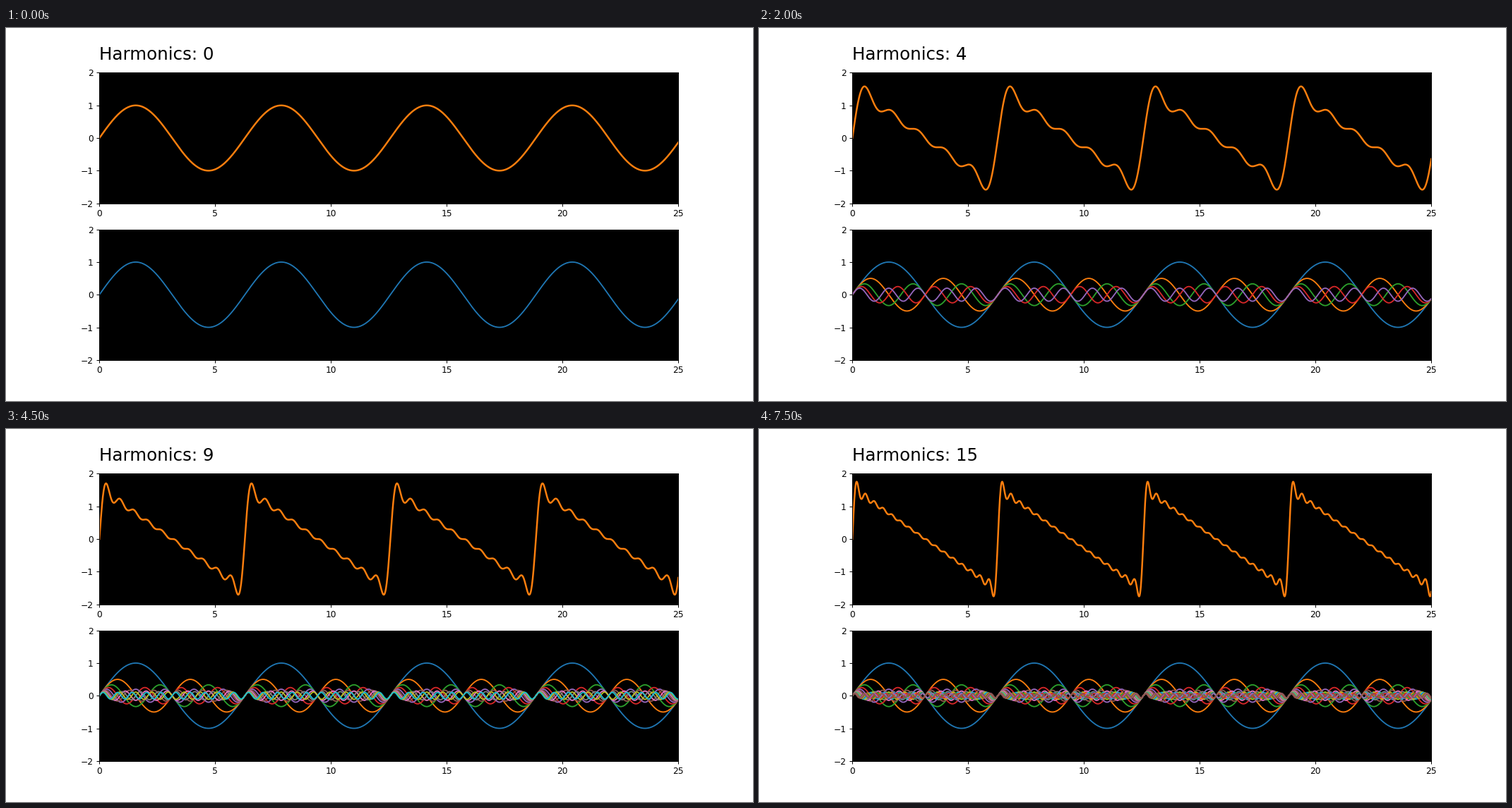
A matplotlib script that plays this animation: 1058x529 px, repeating every 8 s.

```python
import numpy as np
import matplotlib.pyplot as plt
from matplotlib.animation import FuncAnimation

WIDTH, HEIGHT = 1058, 529
STEPS = 16
X_MAX = 25

plt.rcParams["font.family"] = "DejaVu Sans"

fig, (sum_ax, parts_ax) = plt.subplots(2, 1, figsize=(12, 6), dpi=HEIGHT / 6)

for ax in (sum_ax, parts_ax):
    ax.set_facecolor("black")
    ax.set_xlim(0, X_MAX)
    ax.set_ylim(-2, 2)
    ax.set_yticks(range(-2, 3))

x = np.linspace(0, X_MAX, 1500)
waves = [np.sin(k * x) / k for k in range(1, STEPS + 1)]
sums = np.cumsum(waves, axis=0)

title = sum_ax.text(0, 2.4, "", fontsize=20)
sum_line, = sum_ax.plot([], [], color="C1", lw=2)
part_lines = [parts_ax.plot(x, wave, color=f"C{i % 10}", lw=1.5)[0]
              for i, wave in enumerate(waves)]


def update(n):
    title.set_text(f"Harmonics: {n}")
    sum_line.set_data(x, sums[n])
    for i, line in enumerate(part_lines):
        line.set_visible(i <= n)
    return [title, sum_line, *part_lines]


anim = FuncAnimation(fig, update, frames=STEPS, init_func=lambda: update(0),
                     interval=500, repeat=True, repeat_delay=0)
plt.show()
```
